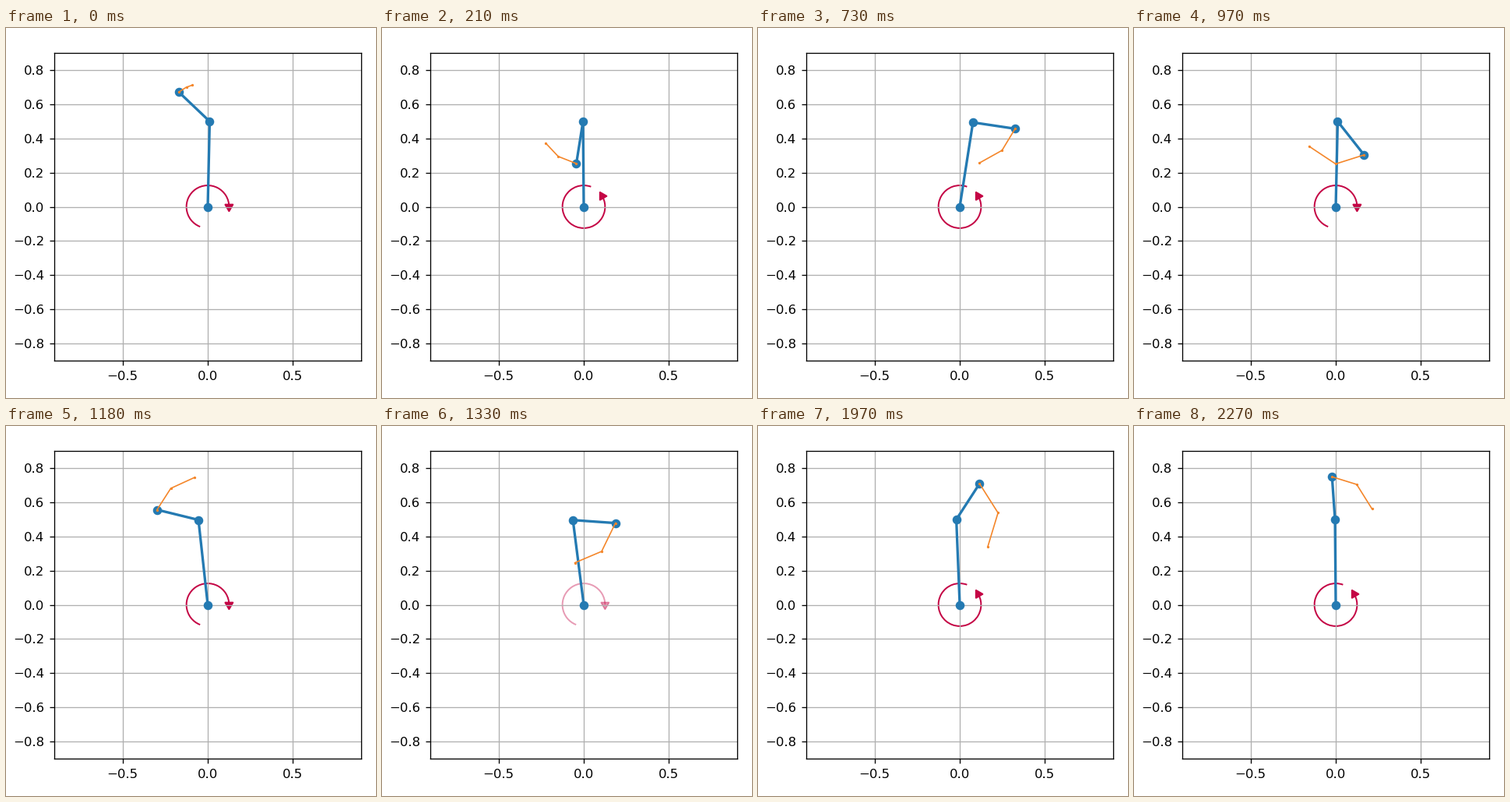
Animation of 475x475 px, one loop 2300 ms. Source, as a matplotlib script:

```python
import matplotlib.pyplot as plt
import numpy as np
from matplotlib.animation import FuncAnimation
from matplotlib.patches import Arc, RegularPolygon

L1, L2 = 0.5, 0.25
STEPS = 69          # simulation steps per loop, 30 per second
TICK = 10           # ms per drawn frame
TICKS = 230
RED, BLUE, ORANGE = "#c40545", "#247ab2", "#f4862a"

# Key poses: step, lean of the first link from vertical and its rate,
# direction of the second link and its rate (degrees, per step)
POSES = np.array([
    (0, 1.3, -1.2, 136.5, 12),
    (12, 3.1, 0.6, 414, 21.5),
    (22, 8.9, 2.2, 711.5, 33),
    (29, 1.3, -1.8, 1028.3, 43),
    (40, -7.3, 0.3, 1436, 45),
    (50, -9.4, -0.4, 1786.3, 47),
    (59, -2.3, 0, 2217, 48),
    (68, -0.5, 2.2, 2614, 38),
])

# (first step, torque sign and strength)
TORQUE = [(0, -1), (6, 1), (25, -1), (38, -0.4), (42, -1), (56, 1)]


def hermite(x, kx, ky, slope):
    """Cubic curve through the keys with the given slopes."""
    i = np.clip(np.searchsorted(kx, x, side="right") - 1, 0, len(kx) - 2)
    h = kx[i + 1] - kx[i]
    s = (x - kx[i]) / h
    return ((1 + 2 * s) * (1 - s) ** 2 * ky[i]
            + s * (1 - s) ** 2 * h * slope[i]
            + s ** 2 * (3 - 2 * s) * ky[i + 1]
            + s ** 2 * (s - 1) * h * slope[i + 1])


# two steps of history come before the first pose
steps = np.arange(-2, STEPS)
key, lean, lean_rate, spin, spin_rate = POSES.T
lean = np.radians(hermite(steps, key, lean, lean_rate))
spin = np.radians(hermite(steps, key, spin, spin_rate))
elbow = L1 * np.column_stack([np.sin(lean), np.cos(lean)])
tip = elbow + L2 * np.column_stack([np.cos(spin), np.sin(spin)])

fig = plt.figure(figsize=(4, 4), dpi=118.75)
ax = fig.add_axes([62 / 475, 1 - 426.8 / 475, 394 / 475, 394.6 / 475])
ax.set(xlim=(-0.9, 0.9), ylim=(-0.9, 0.9), xticks=[-0.5, 0, 0.5],
       yticks=np.arange(-4, 5) / 5)
ax.tick_params(axis="x", pad=4.5)
ax.tick_params(axis="y", pad=4.2)
ax.grid()


def turn_arrow(start, end, head, facing):
    """Arc around the base with a triangle at the head angle."""
    a = np.radians(head)
    center = (L2 / 2 * np.cos(a), L2 / 2 * np.sin(a))
    arc = Arc((0, 0), L2, L2, theta1=start, theta2=end, color=RED, lw=1.2)
    tri = RegularPolygon(center, 3, radius=L2 / 9,
                         orientation=np.radians(facing), color=RED)
    return [ax.add_patch(arc), ax.add_patch(tri)]


ccw = turn_arrow(70, 390, 30, 30)
cw = turn_arrow(0, 249, 0, 180)
links, = ax.plot([], [], "o-", lw=2, color=BLUE)
trace, = ax.plot([], [], ".-", lw=1, ms=2, color=ORANGE)


def draw(n):
    # 30 steps per second shown on a 33 per second clock
    slot = int((n + 0.5) * 0.33)
    step = min(round(slot * 30 / 33), STEPS - 1)
    i = step + 2
    links.set_data([0, elbow[i, 0], tip[i, 0]], [0, elbow[i, 1], tip[i, 1]])
    trace.set_data(tip[i - 2:i + 1].T)
    torque = [u for first, u in TORQUE if first <= step][-1]
    for parts, sign in ((ccw, 1), (cw, -1)):
        for part in parts:
            part.set_visible(torque * sign > 0)
            part.set_alpha(abs(torque))
    return links, trace, *ccw, *cw


anim = FuncAnimation(fig, draw, frames=TICKS, interval=TICK, repeat=True,
                     repeat_delay=0)
plt.show()
```
